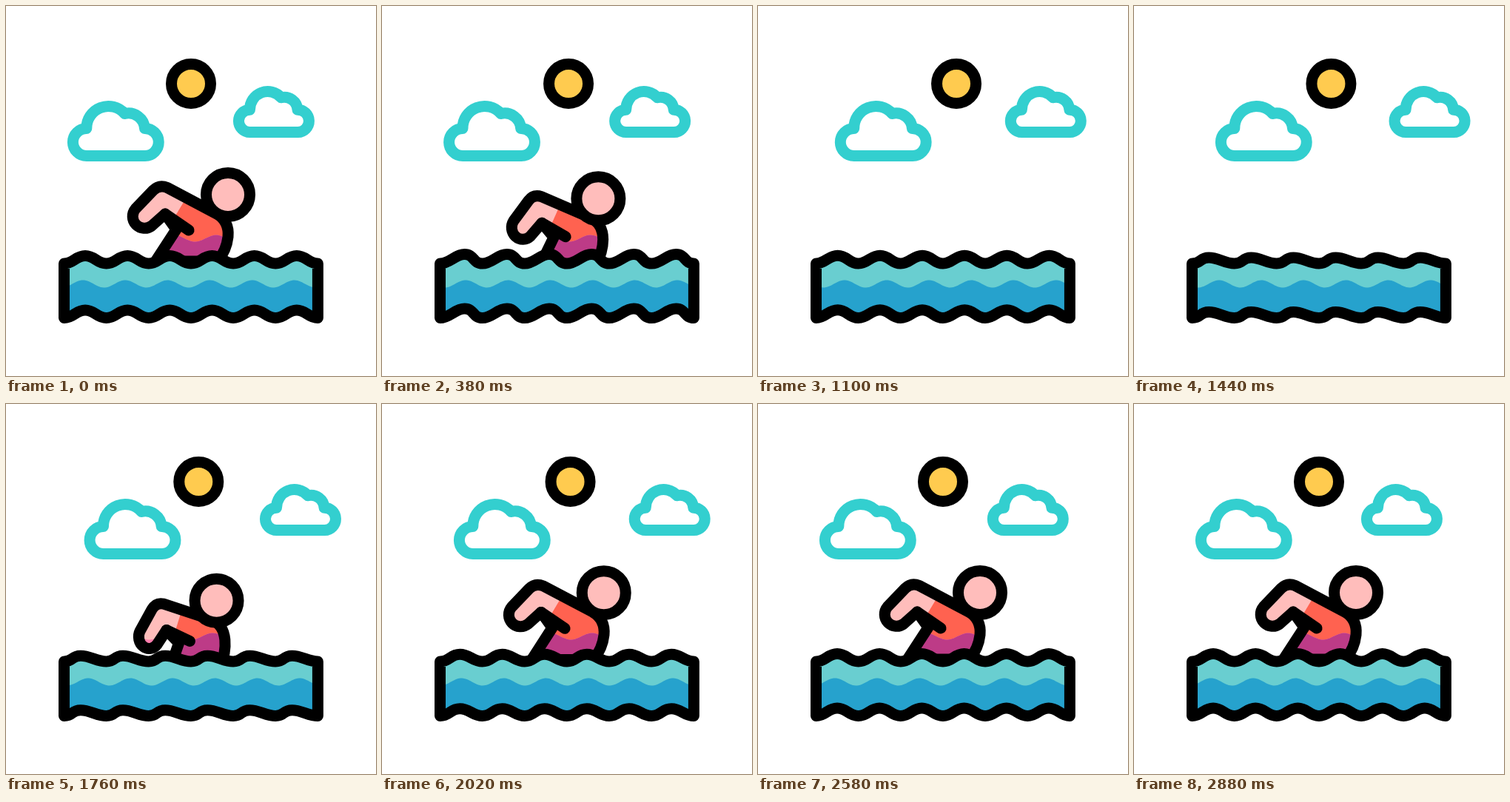
Recreate the animation shown at these times as an HTML page with a canvas. Size 500 by 500 pixels, loop 2.94 s.

```html
<!DOCTYPE html>
<html lang="en">
<head>
<meta charset="utf-8">
<title>Swimmer</title>
<style>
html, body { margin: 0; height: 100%; overflow: hidden; background: #fff; }
canvas { display: block; }
</style>
</head>
<body>
<canvas id="stage" width="500" height="500"></canvas>
<script>
const ctx = document.getElementById('stage').getContext('2d');
const LOOP = 2940, LINE = 15, WAVE = 57.15;
const SKIN = '#ffbdbb', RED = '#ff6250', WET_SKIN = '#ff7fae', PURPLE = '#bd3b87';
const TEAL = '#69ced0', BLUE = '#26a2cd', CLOUD = '#33cfcf', SUN = '#ffcb4f', BLACK = '#000';

const clamp = (v, lo = 0, hi = 1) => Math.min(hi, Math.max(lo, v));
const ease = u => (1 - Math.cos(Math.PI * clamp(u))) / 2;

// Rises from start to peak, then returns to zero at end
const swing = (t, start, peak, end) =>
  t < peak ? ease((t - start) / (peak - start)) : ease((end - t) / (end - peak));

function fill(path, color) {
  ctx.fillStyle = color;
  ctx.fill(path);
}

function outline(path, color = BLACK) {
  ctx.strokeStyle = color;
  ctx.stroke(path);
}

function placed(shape, matrix) {
  const p = new Path2D();
  p.addPath(shape, matrix);
  return p;
}

function disc(x, y, r, color) {
  const p = new Path2D();
  p.arc(x, y, r, 0, 7);
  fill(p, color);
  outline(p);
}

const puff = new Path2D('M18.5 0A18.5 18.5 0 0 1 18.3 -37A29.5 29.5 0 0 1 70 -57' +
  'A22 22 0 0 1 97 -37A18.5 18.5 0 0 1 97.5 0Z');

function cloud(left, bottom, size) {
  const p = placed(puff, new DOMMatrix().translate(left, bottom).scale(size));
  outline(p, CLOUD);
}

// Everything below a sine wave with a crest at the given x
function below(crest, y, amp) {
  const p = new Path2D();
  for (let x = 70; x <= 430; x += 2) {
    p.lineTo(x, y - amp * Math.cos((x - crest) / WAVE * 2 * Math.PI));
  }
  p.lineTo(430, 500);
  p.lineTo(70, 500);
  p.closePath();
  return p;
}

const torso = new Path2D('M197 297A16 16 0 0 1 175 274L199 249Q207 241 218 245.5' +
  'L285 281Q302 291 300 312Q298 330 286 345H202L230 302L215 281Z');
const armpit = new Path2D('M215 281L247 303');
const suit = new Path2D('M246 255L228 285L190 400H360V240Z');

// 0 = stroke pose, 1 = half submerged, larger = fully under water
function divePose(t) {
  if (t < 160 || t > 2200) return 0;
  return t < 1250 ? ((t - 160) / 500) ** 2.2 : 0.34 * ((2200 - t) / 440) ** 4.6;
}

function swimmer(t) {
  const dive = Math.min(divePose(t), 4.2);
  const bend = Math.min(dive, 1.4);
  // The body turns about the elbow and gets narrower as it sinks
  const pose = new DOMMatrix()
    .translate(212 - 4 * dive, 261 + 76 * dive)
    .scale(1 - 0.35 * bend, 1)
    .rotate(-35 * bend)
    .translate(-212, -261);
  const body = placed(torso, pose), dressed = placed(suit, pose);

  ctx.save();
  ctx.beginPath();
  ctx.rect(0, 0, 500, 385);
  ctx.clip();

  ctx.save();
  ctx.clip(body);
  fill(body, SKIN);
  fill(dressed, RED);
  ctx.clip(below(284 - 14 * bend, 314, 4.5));
  fill(body, WET_SKIN);
  fill(dressed, PURPLE);
  ctx.restore();

  outline(body);
  outline(placed(armpit, pose));
  disc(300 - 46 * dive, 255 + 32 * dive, 29.5, SKIN);
  ctx.restore();
}

function water(t) {
  const lean = Math.sin(clamp((t - 160) / 1940) * 2 * Math.PI);
  const left = 78.5, count = 6, bend = 13;
  const dx = 7 * lean, rise = 10.5 + 3 * lean;
  const pool = new Path2D();

  const edge = (y, dir) => {
    for (let i = 0; i < count; i++) {
      const from = left + WAVE * (dir > 0 ? i : count - i);
      const to = from + dir * WAVE;
      const top = (from + to) / 2 + dx;
      const b = dir * bend;
      pool.bezierCurveTo(from + b, y, top - b, y - rise, top, y - rise);
      pool.bezierCurveTo(top + b, y - rise, to - b, y, to, y);
    }
  };
  pool.moveTo(left, 348);
  edge(348, 1);
  pool.lineTo(left + count * WAVE, 421.5);
  edge(421.5, -1);
  pool.closePath();

  // The inner wave runs past one wavelength, then settles back onto it
  const drift = 70 * ease((t - 160) / 940) - (70 - WAVE) * ease((t - 1100) / 1400);
  ctx.save();
  ctx.clip(pool);
  fill(pool, TEAL);
  fill(below(104 + drift, 375.5, 5), BLUE);
  ctx.restore();
  outline(pool);
}

function draw(now) {
  const t = now % LOOP;
  ctx.fillStyle = '#fff';
  ctx.fillRect(0, 0, 500, 500);
  ctx.lineWidth = LINE;
  ctx.lineJoin = ctx.lineCap = 'round';

  disc(250 + 18.3 * swing(t, 160, 1180, 2440), 105, 26.5, SUN);
  cloud(90.5 + 27 * swing(t, 320, 1460, 2610), 202.5, 1);
  cloud(314.5 + 38.5 * swing(t, 320, 1560, 2800), 170.5, 0.82);
  swimmer(t);
  water(t);
}

const begin = performance.now();
function tick() {
  draw(performance.now() - begin);
  requestAnimationFrame(tick);
}
tick();
</script>
</body>
</html>
```
